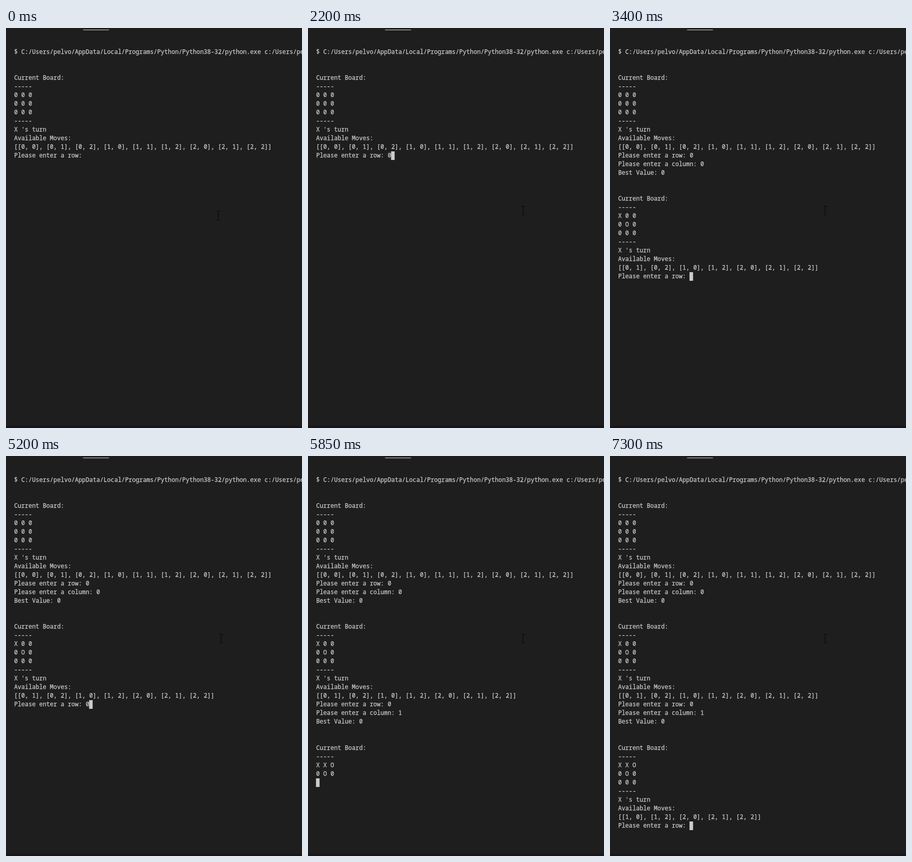
An HTML page for the animation above (8 s loop, 582 by 788 pixels).

```html
<!DOCTYPE html>
<html lang="en">
<head>
<meta charset="utf-8">
<title>Terminal tic-tac-toe</title>
<style>
  html, body { margin: 0; width: 100%; height: 100%; overflow: hidden; background: #1e1e1e; }
  svg { display: block; }
  text { font: 11.72px "Noto Sans Mono", "DejaVu Sans Mono", monospace; fill: #ccc; stroke: #ccc; stroke-width: .25px; white-space: pre; font-variant-ligatures: none; }
</style>
</head>
<body>
<svg width="582" height="788" viewBox="0 0 582 788">
  <rect width="582" height="788" fill="#1e1e1e"/>
  <rect x="151.5" y="3" width="51" height="1.4" fill="#a5a5a5"/>
  <rect y="784" width="582" height="4" fill="#1b1319"/>
  <g id="lines"></g>
  <rect id="caret" width="7" height="17" fill="#ccc"/>
  <path id="pointer" d="M-4 -8.5H-1L0 -7.5L1 -8.5H4M0 -7.5V7.5M-4 8.5H-1L0 7.5L1 8.5H4" fill="none" stroke="#0b0b0b" stroke-width="1.2"/>
</svg>
<script>
const LOOP = 8000, LEFT = 16, TOP = 38.6, ROW = 17.03, COL = 7.032, ROWS = 41;
const FOCUS_TIME = 1250, POINTER_TIME = 750;

const board = rows => `\n\nCurrent Board:\n-----\n${rows.join("\n")}\n`;

// Free cells are the zeros of the board.
function prompt(rows) {
  const moves = rows.flatMap((row, r) =>
    row.split(" ").flatMap((cell, c) => cell === "0" ? [`[${r}, ${c}]`] : []));
  return `-----\nX 's turn\nAvailable Moves:\n[${moves.join(", ")}]\nPlease enter a row: `;
}

const empty = ["0 0 0", "0 0 0", "0 0 0"];
const second = ["X 0 0", "0 O 0", "0 0 0"];
const third = ["X X O", "0 O 0", "0 0 0"];
const askColumn = "Please enter a column: ";
const best = "Best Value: 0\n";
const command = "$ C:/Users/pelvo/AppData/Local/Programs/Python/Python38-32/python.exe c:/Users/pelvo/\n";

// Text appended to the terminal at each time.
const output = [
  [0, command + board(empty) + prompt(empty)],
  [2200, "0"],
  [2300, "\n"],
  [2350, askColumn],
  [2500, "0"],
  [2750, "\n"],
  [3050, best + board(second.slice(0, 2))],
  [3100, second[2] + "\n" + prompt(second)],
  [5200, "0"],
  [5300, "\n"],
  [5350, askColumn],
  [5650, "1"],
  [5800, "\n"],
  [5850, best + board(third.slice(0, 2))],
  [5900, third[2] + "\n" + prompt(third)]
];

const caret = document.getElementById("caret");
const pointer = document.getElementById("pointer");
const lines = Array.from({ length: ROWS }, (_, i) => {
  const line = document.createElementNS("http://www.w3.org/2000/svg", "text");
  line.setAttribute("x", LEFT);
  line.setAttribute("y", TOP + i * ROW + 12);
  return document.getElementById("lines").appendChild(line);
});

function draw(t) {
  const rows = output.filter(([at]) => at <= t).map(([, text]) => text).join("").split("\n");
  lines.forEach((line, i) => {
    const text = rows[i] || "";
    if (line.textContent !== text) line.textContent = text;
  });
  const last = rows.length - 1;
  caret.setAttribute("x", LEFT + rows[last].length * COL - 0.3);
  caret.setAttribute("y", Math.round(TOP + last * ROW));
  caret.setAttribute("visibility", t < FOCUS_TIME ? "hidden" : "visible");
  pointer.setAttribute("transform", t < POINTER_TIME ? "translate(417.5 369.5)" : "translate(423 359.5)");
}

const start = performance.now();
function tick() {
  draw((performance.now() - start) % LOOP);
  requestAnimationFrame(tick);
}
tick();
</script>
</body>
</html>
```
